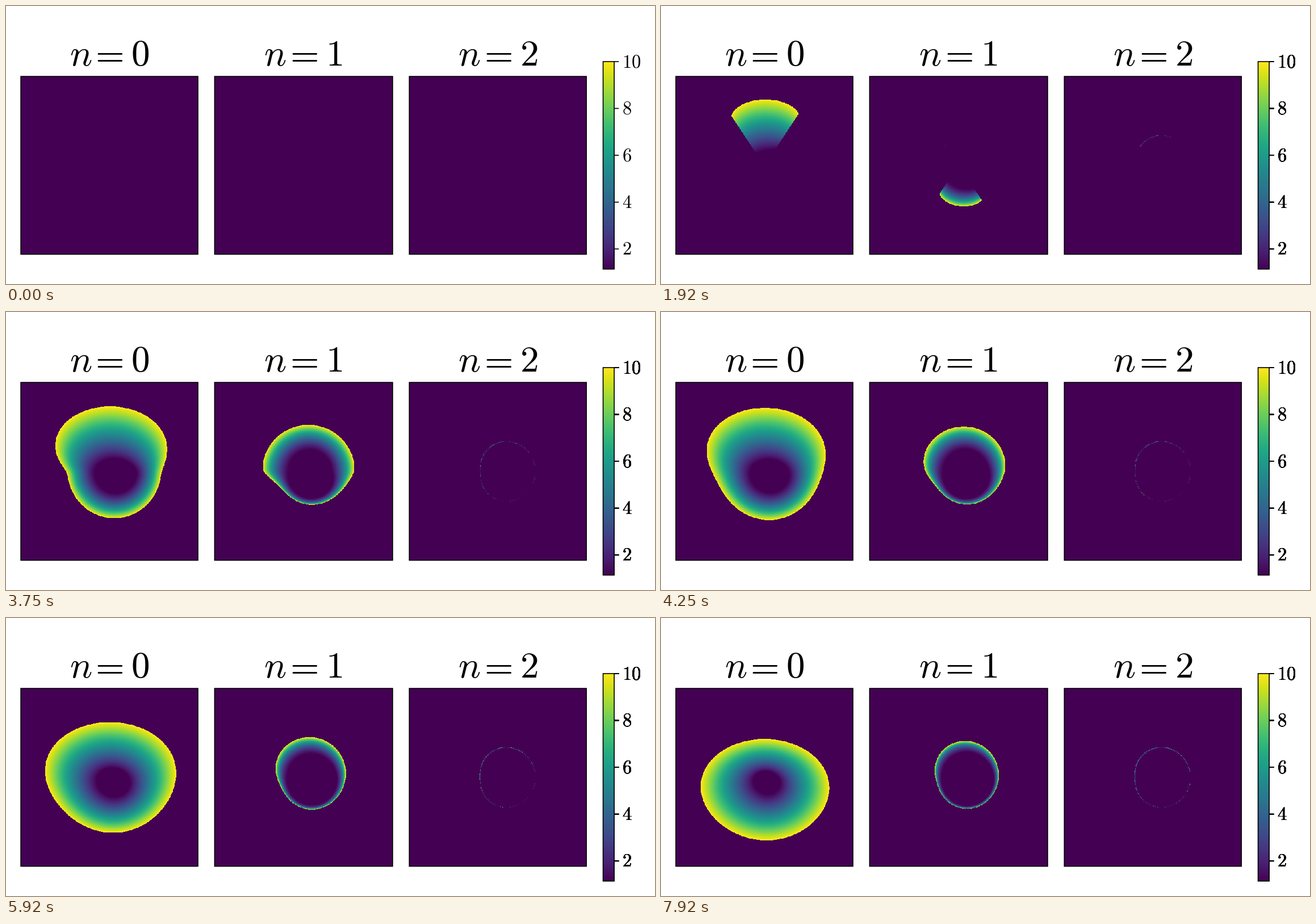
Animation of 1143 by 490 pixels, one loop 8 s. Source, as a matplotlib script:

```python
import numpy as np
import matplotlib.pyplot as plt
from matplotlib.animation import FuncAnimation
from matplotlib.patches import Rectangle

plt.rcParams["mathtext.fontset"] = "cm"

WIDTH, HEIGHT, DPI = 1143, 490, 100
FRAMES, LOOP_MS = 96, 8000
UNIT = WIDTH / 700                  # pixels per layout unit

SPIN = 0.99
HORIZON = 1 + np.sqrt(1 - SPIN**2)
R_MAX = 10
FIELD = 15                          # half width of the view
CELLS = 400
OBSERVER = np.radians(135)
CONE_STEP = np.pi / 179             # growth of the cone angle per frame
ORDERS = 3


def trace_rays():
    """Follow rays back from the screen around a Kerr black hole.

    Returns colour indices [order, frame, row, column] of the radius at which
    each ray meets the cone shown in that frame.
    """
    images = np.zeros((ORDERS, FRAMES, CELLS * CELLS), np.uint8)
    axis = np.linspace(-FIELD, FIELD, CELLS)
    beta, alpha = (g.ravel() for g in np.meshgrid(axis, axis, indexing="ij"))
    cell = np.flatnonzero(np.hypot(alpha, beta) < 12.6)
    alpha, beta = alpha[cell], beta[cell]

    lam = -alpha * np.sin(OBSERVER)
    eta = (alpha**2 - SPIN**2) * np.cos(OBSERVER)**2 + beta**2
    shift = SPIN**2 - SPIN * lam
    carter = eta + (lam - SPIN)**2
    # Coefficients of the equations for u = 1/r and c = cos(theta)
    u1, u2, u3 = 2 * shift - carter, 3 * carter, 2 * (shift**2 - SPIN**2 * carter)
    c1 = SPIN**2 - eta - lam**2
    h = 0.016 / np.sqrt(eta + lam**2 + SPIN**2)

    u, du = np.zeros_like(beta), np.ones_like(beta)
    c, dc = np.full_like(beta, np.cos(OBSERVER)), beta * np.sin(OBSERVER)
    theta = np.arccos(c)
    level = np.floor(theta / CONE_STEP).astype(int)
    turns = np.zeros(beta.size, int)
    below = (beta < 0).astype(int)

    for step in range(1000):
        if step % 8 == 0:
            keep = (u < 1 / HORIZON) & ((du > 0) | (u > 0.09)) & (turns <= ORDERS)
            if not keep.any():
                break
            (cell, u1, u2, u3, c1, h, u, du, c, dc, theta, level, turns, below) = (
                v[keep] for v in (cell, u1, u2, u3, c1, h, u, du, c, dc,
                                  theta, level, turns, below))
        u_old, theta_old, level_old, dc_old = u, theta, level, dc
        mid = u + h / 2 * du
        du = du + h * mid * (u1 + mid * (u2 + mid * u3))
        u = mid + h / 2 * du
        mid = c + h / 2 * dc
        dc = dc + h * mid * (c1 - 2 * SPIN**2 * mid * mid)
        c = mid + h / 2 * dc

        turns = turns + (dc * dc_old < 0)
        theta = np.arccos(np.clip(c, -1, 1))
        level = np.floor(theta / CONE_STEP).astype(int)

        hit = np.flatnonzero(level != level_old)
        k = np.maximum(level[hit], level_old[hit])
        wide = k * CONE_STEP > np.pi - OBSERVER
        order = turns[hit] - below[hit] * wide
        part = (k * CONE_STEP - theta_old[hit]) / (theta[hit] - theta_old[hit])
        u_hit = u_old[hit] + part * (u[hit] - u_old[hit])
        good = ((k > 0) & (k < FRAMES) & (order >= 0) & (order < ORDERS)
                & (u_hit > 1 / R_MAX) & (u_hit < 1 / HORIZON)
                & (wide | (level[hit] < level_old[hit])))
        shade = (1 / u_hit[good] - HORIZON) / (R_MAX - HORIZON) * 256
        images[order[good], k[good], cell[hit[good]]] = np.clip(shade, 0, 255)

    return images.reshape(ORDERS, FRAMES, CELLS, CELLS)


images = trace_rays()

fig = plt.figure(figsize=(WIDTH / DPI, HEIGHT / DPI), dpi=DPI, facecolor="white")
ax = fig.add_axes([0, 0, 1, 1])
ax.axis("off")
LINE = UNIT * 72 / DPI              # one layout unit in points


def math_text(x, y, text, size, align="left"):
    return ax.text(x, y, f"${text}$", fontsize=size * LINE, ha=align,
                   va="baseline", color="black")


def shaded_box(data, left, right, top, bottom):
    picture = ax.imshow(data, extent=(left, right, bottom, top), origin="lower",
                        cmap="viridis", vmin=0, vmax=255, aspect="auto",
                        interpolation="nearest", zorder=1)
    ax.add_patch(Rectangle((left, top), right - left, bottom - top, fill=False,
                           ec="black", lw=LINE, snap=False, zorder=2))
    return picture


panels = []
for n, (left, right) in enumerate([(16, 207), (225, 417), (435, 626)]):
    panels.append(shaded_box(images[n, 0], left, right, 76, 268))
    middle = (left + right) / 2
    math_text(middle - 42.9, 64, "n", 40)
    math_text(middle + 15.2, 64, "=", 40, align="right")
    math_text(middle + 23.5, 64, str(n), 40)

BAR_LEFT, BAR_RIGHT, BAR_TOP, BAR_BOTTOM = 644, 656, 60, 284
shaded_box(np.arange(256)[:, None], BAR_LEFT, BAR_RIGHT, BAR_TOP, BAR_BOTTOM)


def scale_layer():
    """One copy of the colour bar's ticks and labels."""
    artists = []
    for value in range(2, 11, 2):
        height = (value - HORIZON) / (R_MAX - HORIZON) * (BAR_BOTTOM - BAR_TOP)
        y = BAR_BOTTOM - height
        artists += ax.plot([BAR_RIGHT, BAR_RIGHT + 5], [y, y], color="black",
                           lw=LINE, solid_capstyle="butt", snap=False)
        artists.append(math_text(664.2, y + 6.2, str(value), 20))
    return artists


# The scale is overprinted during the first frames, which hardens its edges.
layers = [scale_layer() for _ in range(7)]

ax.set_xlim(0, WIDTH / UNIT)
ax.set_ylim(HEIGHT / UNIT, 0)


def update(frame):
    for n, panel in enumerate(panels):
        panel.set_data(images[n, frame])
    for i, layer in enumerate(layers):
        for artist in layer:
            artist.set_visible(i <= frame)
    return panels


animation = FuncAnimation(fig, update, frames=FRAMES, interval=LOOP_MS / FRAMES,
                          repeat=True, repeat_delay=0, blit=False)
plt.show()
```
